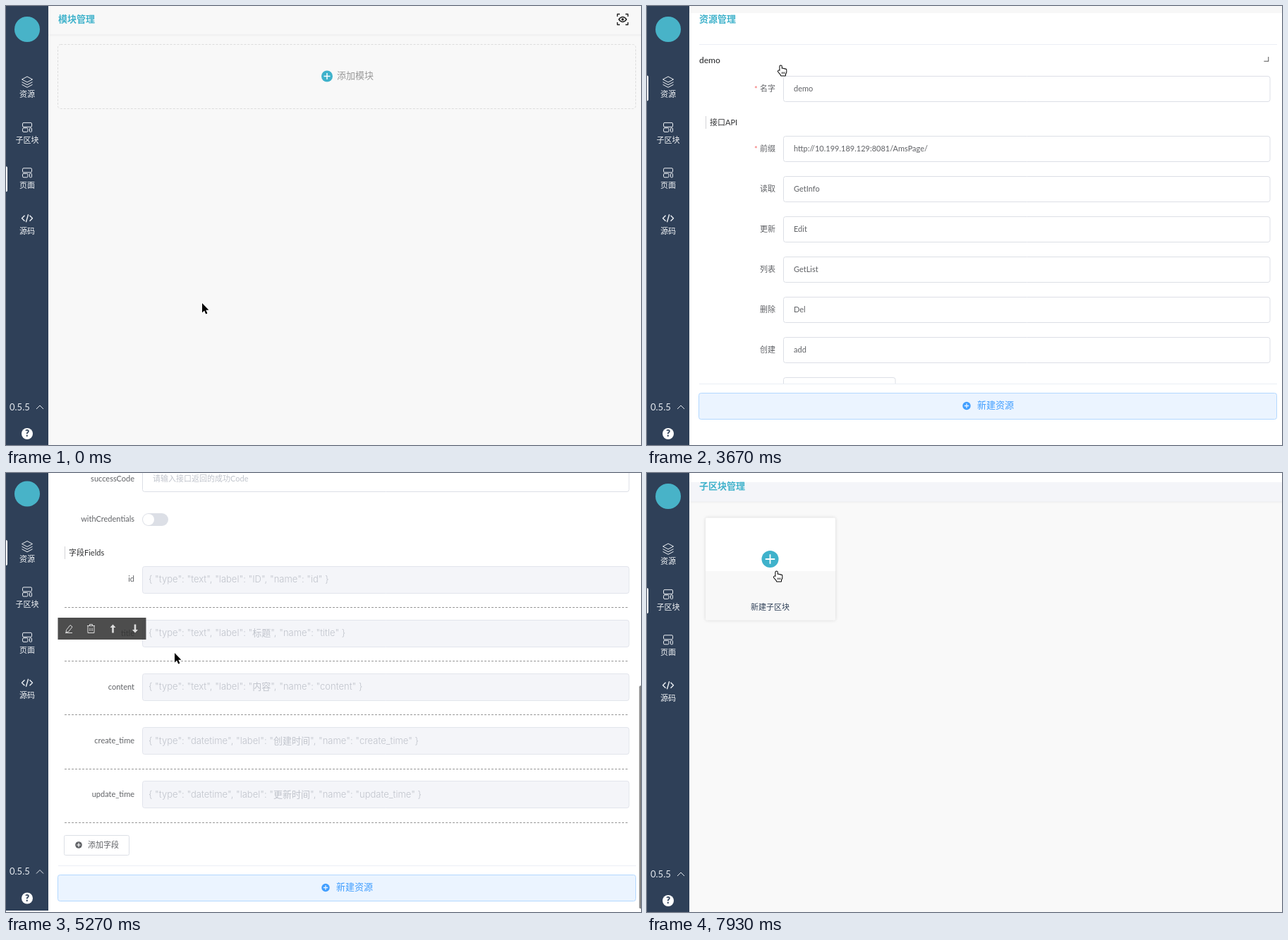
An HTML page with a canvas for the animation above (8 s loop, 900 by 622 pixels).

```html
<!DOCTYPE html>
<html lang="zh-CN">
<head>
<meta charset="utf-8">
<style>
html, body { margin: 0; width: 100%; height: 100%; overflow: hidden; background: #fff; }
canvas { display: block; }
</style>
</head>
<body>
<canvas id="stage" width="900" height="622"></canvas>
<script>
const ctx = document.getElementById('stage').getContext('2d');
const W = 900, H = 622, LOOP = 8000, STEP = 90;
const CJK = '"Noto Sans CJK SC", "Noto Sans CJK", sans-serif';
const UI = 'Lato, ' + CJK, WIDE = 'Inter, ' + CJK;
const TEAL = '#3fb2cb', NAVY = '#2f4058', BLUE = '#409eff';

// Progress from 0 to 1 in hard steps; the first step lands on `first`, the last on `last`.
function ramp(t, first, last = first) {
  const count = Math.round((last - first) / STEP) + 1;
  const done = Math.floor((t - first) / STEP) + 1;
  return Math.max(0, Math.min(count, done)) / count;
}
const smooth = p => p * p * (3 - 2 * p);
const between = (t, a, b) => t >= a && t < b;

// Pointer moves: first step, last step, x, y.
const MOVES = [
  [0, 0, 278, 421], [450, 450, 253, 420], [600, 950, 39, 165], [1220, 1490, 32, 116],
  [2530, 2620, 182, 120], [2770, 3220, 189, 84], [3790, 3970, 239, 255], [5530, 5620, 201, 260],
  [5970, 6480, 38, 174], [6890, 6980, 37, 183], [7610, 7880, 183, 139]
];
function pointerAt(t) {
  let x = 0, y = 0;
  for (const [first, last, toX, toY] of MOVES) {
    const p = ramp(t, first, last);
    x += (toX - x) * p;
    y += (toY - y) * p;
  }
  return { x, y };
}

function rect(x, y, w, h, fill) {
  ctx.fillStyle = fill;
  ctx.fillRect(x, y, w, h);
}
function box(x, y, w, h, r, fill, stroke) {
  ctx.beginPath();
  ctx.roundRect(x, y, w, h, r);
  if (fill) { ctx.fillStyle = fill; ctx.fill(); }
  if (stroke) { ctx.strokeStyle = stroke; ctx.lineWidth = 1; ctx.stroke(); }
}
function disc(x, y, r, fill) {
  ctx.beginPath();
  ctx.arc(x, y, r, 0, 7);
  ctx.fillStyle = fill;
  ctx.fill();
}
function path(d, x, y, { fill, stroke, width = 1, turn = 0 }) {
  const shape = new Path2D(d);
  ctx.save();
  ctx.translate(x, y);
  ctx.rotate(turn);
  ctx.lineWidth = width;
  ctx.lineJoin = 'round';
  if (stroke) { ctx.strokeStyle = stroke; ctx.stroke(shape); }
  if (fill) { ctx.fillStyle = fill; ctx.fill(shape); }
  ctx.restore();
}
function text(s, x, y, size, color, { align = 'left', weight = 400, family = UI } = {}) {
  ctx.font = `${weight} ${size}px ${family}`;
  ctx.textAlign = align;
  ctx.textBaseline = 'middle';
  ctx.fillStyle = color;
  ctx.fillText(s, x, y + 0.5);
}
function plusDisc(x, y, r, fill, mark) {
  const arm = r * 0.56;
  disc(x, y, r, fill);
  path(`M${-arm} 0H${arm}M0 ${-arm}V${arm}`, x, y, { stroke: mark, width: 0.8 + r / 12 });
}
function dashed(draw) {
  ctx.setLineDash([3, 2]);
  draw();
  ctx.setLineDash([]);
}
function withAlpha(alpha, draw) {
  if (alpha <= 0) return;
  ctx.save();
  ctx.globalAlpha = alpha;
  draw();
  ctx.restore();
}
function withShadow(blur, color, draw) {
  ctx.save();
  ctx.shadowColor = color;
  ctx.shadowBlur = blur;
  draw();
  ctx.restore();
}
function clipped(y, h, draw) {
  ctx.save();
  ctx.beginPath();
  ctx.rect(60, y, W - 60, h);
  ctx.clip();
  draw();
  ctx.restore();
}

const CHEVRON = 'M-2-4.5L2.5 0L-2 4.5';
const LAYERS = 'M-7.5-3.5L0-7.5L7.5-3.5L0 .5ZM-7.5 .2L0 4.2L7.5 .2M-7.5 3.8L0 7.8L7.5 3.8';
const CODE = 'M-3.5-4L-7.5 0L-3.5 4M3.5-4L7.5 0L3.5 4M1.6-5.5L-1.6 5.5';
const NAV = ['资源', '子区块', '页面', '源码'];
const NAV_PITCH = 64.4;

function navIcon(i, y) {
  const ink = '#eef1f5';
  if (i === 0) path(LAYERS, 30, y, { stroke: ink });
  else if (i === 3) path(CODE, 30, y, { stroke: ink, width: 1.4 });
  else {
    box(23.5, y - 6.5, 13, 6, 1.5, null, ink);
    box(23.5, y + 1, 7.5, 5.5, 1.5, null, ink);
    box(33.5, y + 1, 3, 5.5, 1, null, ink);
  }
}

function sidebar(t) {
  rect(0, 0, 60, H + 1.5, NAVY);
  disc(30, 33, 18, '#48b3c8');
  const marks = [
    t < 7220 ? ramp(t, 1900, 2080) : 0,
    ramp(t, 6480),
    t < 2350 ? 1 : 0,
    0
  ];
  NAV.forEach((name, i) => {
    const y = 107.5 + i * NAV_PITCH, h = 36 * marks[i];
    navIcon(i, y);
    text(name, 30, y + 18, 11, '#f2f4f7', { align: 'center' });
    if (h) box(-2, y + 9 - h / 2, 4, h, 2, '#fff');
  });
  text('0.5.5', 5, 568.5, 13, '#e6eaf0');
  path('M-5 2.5L0-2.5L5 2.5', 48, 568.5, { stroke: '#e6eaf0' });
  disc(30, 606, 8, '#fff');
  text('?', 30, 606, 13, NAVY, { align: 'center', weight: 900 });
}

function header(title, shade) {
  if (shade) {
    rect(60, 40.5, 840, 1, '#ebebed');
    rect(60, 41.5, 840, 1, '#f3f3f4');
  }
  text(title, 74, 19, 13, TEAL, { weight: 700 });
}

function modulesPage() {
  rect(60, 0, 840, H, '#f8f8f8');
  header('模块管理', true);
  dashed(() => box(73.5, 54.5, 819, 91, 4, null, '#dcdcdc'));
  plusDisc(455, 99.5, 8, TEAL, '#fff');
  text('添加模块', 469, 99, 13, '#999');
  path('M-7.5-4V-7.5H-4M4-7.5H7.5V-4M7.5 4V7.5H4M-4 7.5H-7.5V4M-5.5 0Q0-7 5.5 0Q0 7-5.5 0Z',
    874, 19, { stroke: '#222', width: 1.4 });
  disc(874, 19, 1.8, '#222');
}

function createButton(y, hot) {
  const fill = hot ? '#4ca2ff' : '#ebf4ff', ink = hot ? '#fff' : BLUE;
  box(73.5, y + 0.5, 819, 37, 3, fill, hot ? fill : '#b3d8ff');
  plusDisc(453, y + 18.5, 5.7, ink, fill);
  text('新建资源', 468, y + 18, 13, ink, { weight: 500 });
}

function label(s, y, required) {
  text(s, 182, y, 11, '#606266', { align: 'right' });
  if (required) text('*', 152, y + 0.5, 11, '#f56c6c');
}
function section(s, y) {
  rect(83, y - 9, 1, 18, '#d4d4d8');
  text(s, 89, y, 11, '#303133');
}
function input(y, content, { hint, hot, width = 690 } = {}) {
  box(193.5, y - 18, width - 0.5, 36, 3, '#fff', hot ? '#b4b6bb' : '#dcdfe6');
  text(content, 208, y, 11, hint ? '#c0c4cc' : '#606266');
}

const INPUTS = [
  ['前缀', 'http://10.199.189.129:8081/AmsPage/'], ['读取', 'GetInfo'], ['更新', 'Edit'],
  ['列表', 'GetList'], ['删除', 'Del'], ['创建', 'add']
];
const FIELDS = [
  ['id', 'text', 'ID'], ['title', 'text', '标题'], ['content', 'text', '内容'],
  ['create_time', 'datetime', '创建时间'], ['update_time', 'datetime', '更新时间']
];

function toolbar(y) {
  rect(73.5, y, 125, 31, 'rgba(48,48,48,.86)');
  const ink = '#ddd', mid = y + 15.5;
  path('M-3.5 2L2-5L5-2.5L-.5 4.5L-4 5ZM-5 6H5', 89, mid, { stroke: ink });
  path('M-5.5-4H5.5M-2-4V-6H2V-4M-4.5-4V6H4.5V-4M-1.5-1V3.5M1.5-1V3.5', 120.5, mid, { stroke: ink });
  const arrow = 'M0-6L4-1.5H1.3V6H-1.3V-1.5H-4Z';
  path(arrow, 151.5, mid, { fill: ink });
  path(arrow, 183, mid, { fill: ink, turn: Math.PI });
}

function resourceForm(t) {
  label('名字', 117.5, true);
  input(117.5, 'demo');
  section('接口API', 165);
  INPUTS.forEach(([name, content], i) => {
    const y = 202.5 + i * 57;
    label(name, y, i === 0);
    input(y, content, { hot: name === '读取' && between(t, 4150, 4560) });
  });
  label('contentType', 544);
  input(544.5, '请选择表单数据类型', { hint: true, width: 159 });
  path(CHEVRON, 335.5, 544, { stroke: '#c0c4cc', turn: Math.PI / 2 });
  label('successCode', 601);
  input(601.5, '请输入接口返回的成功Code', { hint: true });
  label('withCredentials', 658.5);
  box(193, 650, 37, 18, 9, '#dcdfe6');
  disc(202, 659, 8, '#fff');

  section('字段Fields', 706);
  FIELDS.forEach(([name, type, title], i) => {
    const y = 743.5 + i * 76.2;
    label(name, y);
    box(193.5, Math.round(y - 19) + 0.5, 689.5, 38, 3, '#f4f5f9', '#e2e5ec');
    text(`{ "type": "${type}", "label": "${title}", "name": "${name}" }`, 202, y, 13, '#c0c4cc',
      { weight: 300, family: WIDE });
    dashed(() => path('M83 0H883', 0, Math.round(y + 39.5) + 0.5, { stroke: '#999' }));
  });
  if (between(t, 5270, 5450)) toolbar(798);
  box(82.5, 1106.5, 92, 28, 2, '#fff', '#dcdfe6');
  plusDisc(103, 1120, 4.8, '#606266', '#fff');
  text('添加字段', 116, 1120, 11, '#606266', { weight: 500 });
}

function resourcesPage(t, { x, y }) {
  const open = ramp(t, 3580, 3760) ** 2.165;
  const scroll = 589.5 * (smooth(ramp(t, 4560, 5190)) - ramp(t, 5450, 5540));
  const bottom = Math.round(98 + 1051 * open);
  rect(60, 0, 840, H + 7, '#fff');
  if (t < 4150) rect(60, 0, 840, 10, '#f7f7f7');
  ctx.save();
  ctx.translate(0, -scroll);
  if (between(t, 4150, 5450)) rect(60, 0, 840, 42, '#f4f5f9');
  header('资源管理', false);
  rect(74, 54, 819, 1, '#ebeef5');
  text('demo', 74, 76.5, 12, '#303133', { weight: 500 });
  path(CHEVRON, 879, 76.5, { stroke: '#555', turn: ramp(t, 3580, 3850) * Math.PI / 2 });
  if (open) clipped(98, bottom - 98, () => resourceForm(t));
  rect(74, bottom, 819, 1, '#ebeef5');
  createButton(bottom + 13, !open && x > 74 && y > 104);
  ctx.restore();
  withAlpha(ramp(t, 4740) - ramp(t, 5970, 6330), () =>
    box(897.5, 4 + scroll * 0.51, 4, 316, 2, '#858585'));
}

function blocksPage(t) {
  rect(60, 0, 840, H, '#f9f9f9');
  rect(60, 0, 840, 13, '#fff');
  rect(60, 13, 840, 28, '#f4f5f9');
  header('子区块管理', true);
  withShadow(5, 'rgba(0,0,0,.14)', () => box(83, 63.5, 184, 145, 2, '#fff'));
  if (t >= 7610) rect(83, 139, 184, 69, '#f8f8f8');
  plusDisc(174.5, 122, 12, TEAL, '#fff');
  text('新建子区块', 174.5, 190, 11, NAVY, { align: 'center' });
}

function statusBar(t) {
  const alpha = ramp(t, 2350, 2440) - ramp(t, 2950, 3220) + ramp(t, 6750) - ramp(t, 7700, 7880);
  withAlpha(alpha, () => {
    withShadow(3, 'rgba(0,0,0,.3)', () => box(-4, 604.5, 304, 24, 3, '#fff', '#c4c4c4'));
    text('10.199.201.235:8080/#/' + (t < 5000 ? 'resources' : 'blocks'), 2, 614.5, 11.8, '#444',
      { family: '"Liberation Sans", Arial, sans-serif' });
  });
}

const ARROW = 'M0 0V13.4L3.1 10.6L5.2 15.5L7.4 14.6L5.3 9.8H9.4Z';
const HAND = 'M3.4 8.5V1.7A1.2 1.2 0 0 1 5.8 1.7V5.6A1.1 1.1 0 0 1 8 5.8A1.1 1.1 0 0 1 10.2 6.2' +
  'A1.1 1.1 0 0 1 12.3 6.8V10L11 12.5V14.5H5L4.5 13L1.2 9.2A1.1 1.1 0 0 1 2.9 7.8Z';
const BEAM = 'M-3.5-7Q0-7 0-5.5Q0-7 3.5-7M0-5.5V6M-3.5 7.5Q0 7.5 0 6Q0 7.5 3.5 7.5M-1.5 2H1.5';

function pointer(t, { x, y }) {
  if (between(t, 1900, 3790) || between(t, 6750, 7610) || t >= 7800) {
    path(HAND, x - 4, y, { fill: '#fff', stroke: '#000', width: 2 });
    path('M6.4 9.5V12M8.2 9.5V12M10 9.5V12', x - 4, y, { stroke: '#000', width: 0.8 });
  } else if (between(t, 3970, 5270) || between(t, 5620, 5970)) {
    path(BEAM, x, y, { stroke: '#fff', width: 2.6 });
    path(BEAM, x, y, { stroke: '#000', width: 1.2 });
  } else {
    path(ARROW, x, y, { fill: '#000', stroke: '#fff', width: 2 });
  }
}

function draw(t) {
  const hotspot = pointerAt(t);
  const pageShift = -6.5 * ramp(t, 4150, 4330) + 3 * ramp(t, 5270) + 3.5 * ramp(t, 5450, 5540);
  const resources = ramp(t, 2350, 2530), blocks = ramp(t, 7220, 7400);
  rect(0, 0, W, H, '#fff');
  ctx.save();
  ctx.translate(0, pageShift);
  if (resources < 1) modulesPage();
  if (blocks < 1) withAlpha(resources, () => resourcesPage(t, hotspot));
  withAlpha(blocks, () => blocksPage(t));
  sidebar(t);
  ctx.restore();
  statusBar(t);
  pointer(t, hotspot);
}

const start = performance.now();
function loop() {
  draw((performance.now() - start) % LOOP);
  requestAnimationFrame(loop);
}
loop();
</script>
</body>
</html>
```
